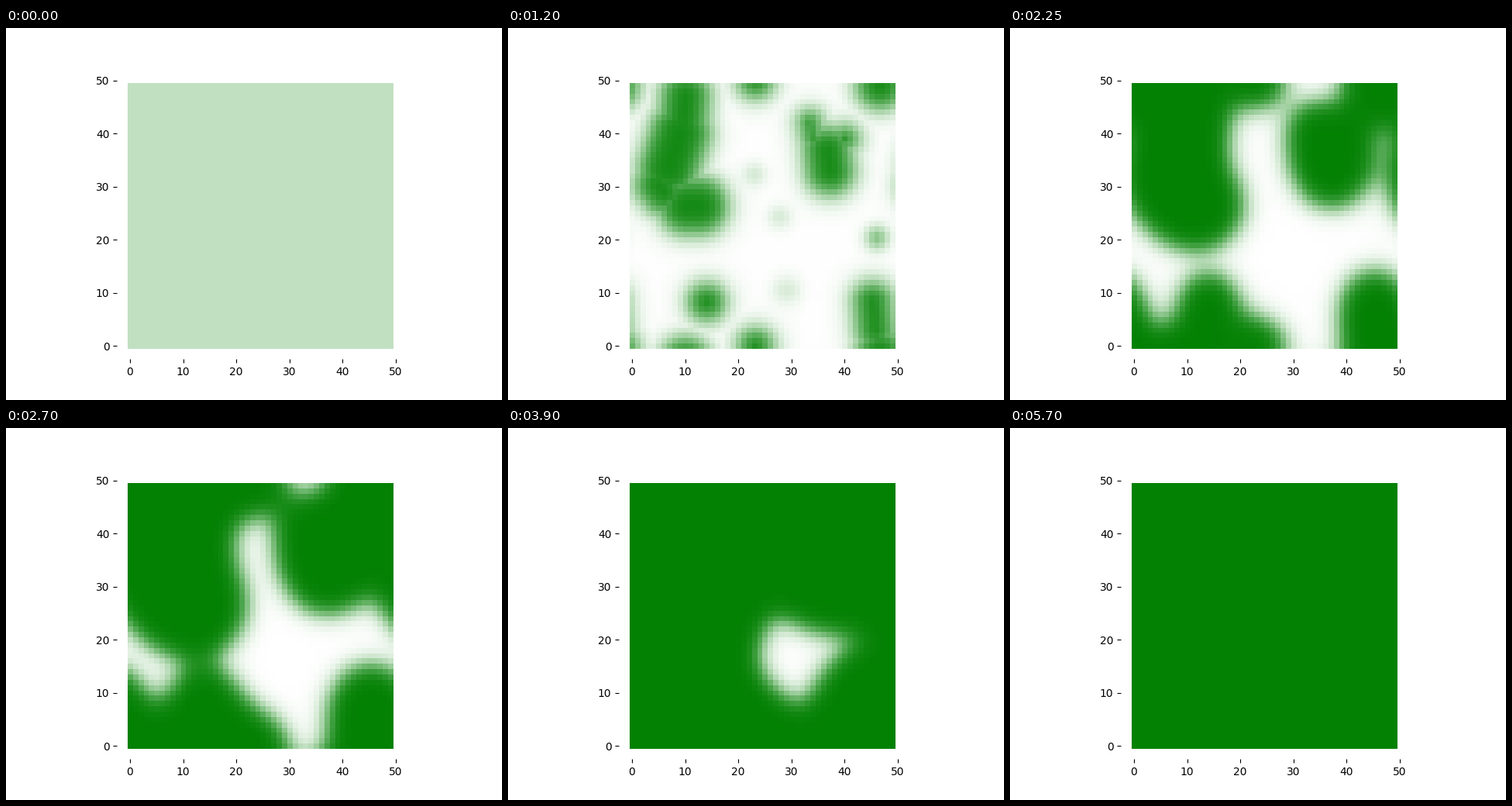
Recreate the animation shown at these times as a matplotlib script. Size 640x480 px, loop 5.85 s.

```python
import numpy as np
import matplotlib.pyplot as plt
from matplotlib.animation import FuncAnimation
from matplotlib.colors import LinearSegmentedColormap

N = 50              # cells per side, periodic in both directions
STEPS = 39
INTERVAL = 150
START = 0.246       # uniform density at the beginning
FORMED = 8          # step at which the patches have taken shape

# Bistable growth: du/dt = D lap(u) + R u (1 - u) (u - A)
D, R, A = 1.2, 2.1, 0.243
SUBSTEPS = 20

gx, gy = np.meshgrid(np.arange(N), np.arange(N))


def wrap(d):
    return (d + N / 2) % N - N / 2


def capsule(x0, y0, x1, y1, r):
    """Signed distance to a rounded bar, positive inside."""
    px, py = wrap(gx - x0), wrap(gy - y0)
    dx, dy = x1 - x0, y1 - y0
    t = np.clip((px * dx + py * dy) / (dx * dx + dy * dy + 1e-9), 0, 1)
    return r - np.hypot(px - t * dx, py - t * dy)


def disc(x, y, r):
    return capsule(x, y, x, y, r)


def bump(x, y, height, sigma=1.6):
    r2 = wrap(gx - x) ** 2 + wrap(gy - y) ** 2
    return height * np.exp(-r2 / (2 * sigma ** 2))


def blur(field, sigma):
    f = np.fft.fftfreq(N)
    g = np.exp(-2 * (np.pi * sigma * f) ** 2)
    return np.fft.ifft2(np.fft.fft2(field) * np.outer(g, g)).real


def sigmoid(z):
    return 1 / (1 + np.exp(-z))


def logit(u):
    return np.log(u / (1 - u))


def patches():
    """Young patches, plus a few bumps too small to survive."""
    inside = np.max([
        # west
        capsule(10, 47, 9.5, 41, 4.4),
        capsule(9, 40, 6.9, 33.5, 5.5),
        capsule(4.9, 30.3, 6, 29, 4.1),
        capsule(10.3, 26.4, 12.5, 26.4, 5.2),
        # middle
        capsule(36.7, 36.8, 37.2, 33, 4.3),
        capsule(33.4, 42, 34, 39, 1.9),
        disc(40, 39, 2.2),
        # south and east
        disc(14, 8.3, 3.2),
        disc(23.2, 0, 3),
        capsule(45.2, 8.4, 45.7, 3, 3.4),
        disc(46.6, -1, 4.2),
    ], axis=0)
    u = 0.94 * sigmoid(inside / 1.2)
    small = (bump(46, 20.4, 0.46) + bump(23, 32.3, 0.16)
             + bump(27.7, 24.3, 0.15) + bump(29, 10.5, 0.15, 1.9))
    return 0.008 + 0.99 * (u + (1 - u) * small)


def laplacian(u):
    return sum(np.roll(u, s, ax) for s in (-1, 1) for ax in (0, 1)) - 4 * u


def advance(u):
    dt = 1 / SUBSTEPS
    for _ in range(SUBSTEPS):
        u = u + dt * (D * laplacian(u) + R * u * (1 - u) * (u - A))
    return u


def emerge(s, goal, noise):
    """Mottled start sharpening into the young patches."""
    grow = ((s - 1) / (FORMED - 1)) ** 1.3
    z = (1 - grow) * (logit(START) + 0.22 * noise) + grow * logit(goal)
    return sigmoid(z)


def history():
    noise = blur(np.random.default_rng(4).normal(size=(N, N)), 1.3)
    noise /= noise.std()
    goal = patches()
    flat = np.full((N, N), START)
    # the first two states are each held for two steps
    states = [flat, flat]
    states += [emerge(s, goal, noise) for s in (2, 2, 4, 5, 6, 7)]
    states.append(goal)
    while len(states) < STEPS:
        states.append(advance(states[-1]))
    return states


states = history()

fig, ax = plt.subplots(figsize=(6.4, 4.8), dpi=100)
cmap = LinearSegmentedColormap.from_list("grass", ["white", "#038103"])
image = ax.imshow(states[0], cmap=cmap, vmin=0, vmax=1, origin="lower",
                  interpolation="nearest")
limits = (-2.45, 51.45)
ticks = range(0, 51, 10)
ax.set(xlim=limits, ylim=limits, xticks=ticks, yticks=ticks)
ax.spines[:].set_visible(False)


def update(s):
    image.set_data(states[s])
    return [image]


anim = FuncAnimation(fig, update, frames=STEPS, init_func=lambda: update(0),
                     interval=INTERVAL, repeat=True, repeat_delay=0)
plt.show()
```
